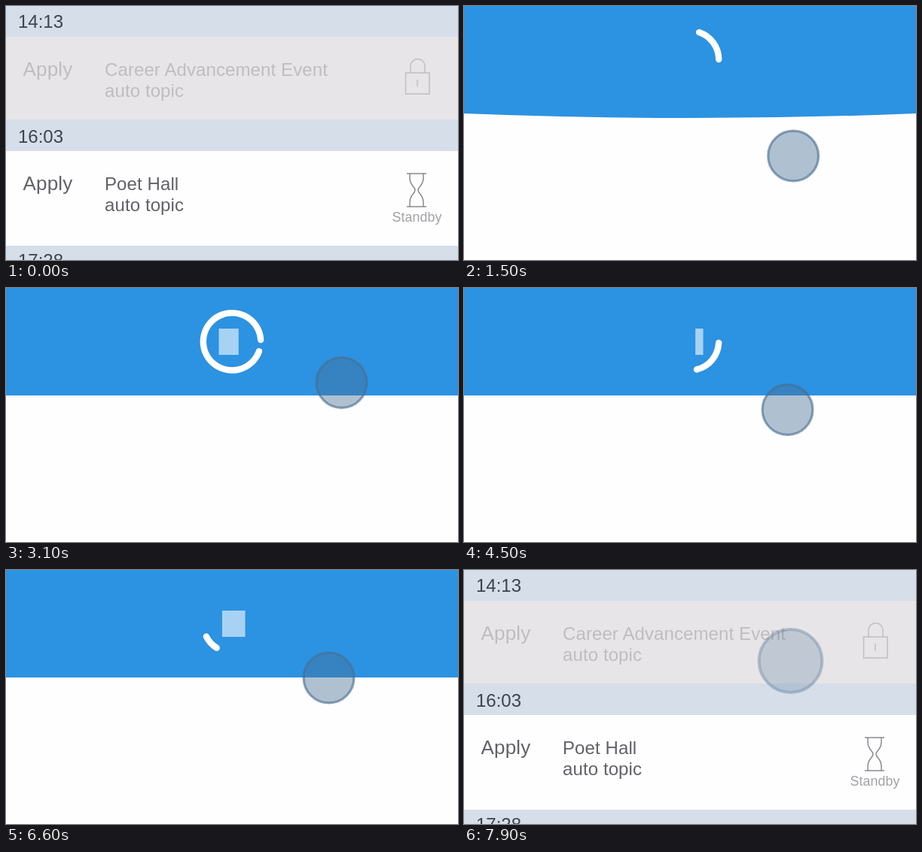
These frames come from a looping animation (600 px wide and 338 px high, 8 s). An HTML page:

```html
<!DOCTYPE html>
<html lang="en">
<head>
<meta charset="utf-8">
<title>Pull to refresh</title>
<style>
  html, body { margin: 0; width: 100%; height: 100%; overflow: hidden; background: #fefdff; }
  svg { display: block; width: 600px; height: 338px; }
  text { font-family: "Liberation Sans", Arial, sans-serif; font-size: 24px; letter-spacing: .1px; fill: #616266; }
  .bar { fill: #d6deea; }
  .time { fill: #3c4450; letter-spacing: 0; }
  .apply { font-size: 26px; letter-spacing: .2px; }
  .off text { fill: #bfbdbf; }
  .small { font-size: 17.8px; fill: #a2a2a4; }
  .icon { fill: none; stroke: #8a8a8d; stroke-width: 1.5; }
  .off .icon { stroke: #c1bfc1; }
  #ring { fill: none; stroke: #fff; stroke-width: 8.4; stroke-linecap: round; }
  #finger { fill: rgba(70, 113, 148, .43); stroke: rgba(72, 110, 142, .62); stroke-width: 3.2; }
</style>
</head>
<body>
<svg viewBox="0 0 600 338">
  <g id="list">
    <rect class="bar" width="600" height="41"/>
    <text class="time" x="16" y="29">14:13</text>

    <g class="off">
      <rect y="41" width="600" height="110" fill="#e8e5e8"/>
      <text class="apply" x="22.5" y="93">Apply</text>
      <text x="131" y="93">Career Advancement Event</text>
      <text x="131" y="121">auto topic</text>
      <path class="icon" d="M530.5 89H562V117H530.5ZM537 89V80A9.5 9.5 0 0 1 556 80V89M546 98V107"/>
    </g>

    <rect class="bar" y="151" width="600" height="42"/>
    <text class="time" x="16" y="182">16:03</text>
    <text class="apply" x="22.5" y="245">Apply</text>
    <text x="131" y="245">Poet Hall</text>
    <text x="131" y="273">auto topic</text>
    <path class="icon" d="M532 223H558M532 267H558M536 223V229C536 239 543 240 543 245S536 251 536 261V267M554 223V229C554 239 547 240 547 245S554 251 554 261V267"/>
    <text class="small" x="512.5" y="287">Standby</text>

    <rect class="bar" y="319" width="600" height="42"/>
    <text class="time" x="16" y="347">17:28</text>
  </g>
  <path id="header" fill="#2c92e2"/>
  <g id="loader">
    <path id="ring"/>
    <rect id="mark" y="54" height="35" fill="#a8d2f3"/>
  </g>
  <circle id="finger" r="33.4"/>
</svg>

<script>
const LOOP = 8000, REST = 143, RADIUS = 38.2, MARK = 35;
const RELEASE = 850, LOAD = 1300, DONE = 7300;

// Finger waypoints: time, x, y.
const path = [[100, 433, 121], [800, 436, 250], [2100, 438, 159.5], [3100, 445.5, 126],
              [4500, 429.5, 162], [6600, 428.5, 143.5], [7500, 433.5, 121]];

const sweep = (t, from, to) => Math.min(1, Math.max(0, (t - from) / (to - from)));
const ease = (t, from, to) => {
  const p = sweep(t, from, to);
  return p * p * (3 - 2 * p);
};
const easeOut = (t, from, to) => 1 - (1 - sweep(t, from, to)) ** 2;

const set = (id, attrs) => {
  const node = document.getElementById(id);
  for (const name in attrs) node.setAttribute(name, attrs[name]);
};

function drawHeader(t) {
  const closing = ease(t, DONE, DONE + 350);
  const edge = REST * (ease(t, 100, 700) - closing);
  const since = Math.max(0, t - RELEASE);
  const spring = Math.exp(-since / 300) * Math.cos(Math.PI * since / 150);
  const middle = edge + 2 * 110 * ease(t, 100, RELEASE) * spring;
  set("header", { d: `M0 0H600V${edge}Q300 ${middle} 0 ${edge}Z` });
  set("list", { transform: `translate(0 ${edge})`, opacity: 1 - ease(t, 250, 700) + closing });
}

function point(deg) {
  const a = deg * Math.PI / 180;
  return `${300 + RADIUS * Math.cos(a)} ${71.3 + RADIUS * Math.sin(a)}`;
}

// The ring turns steadily while its head runs out and its tail catches up.
function drawRing(t) {
  const spin = -83 + 0.057 * (t - LOAD);
  const tail = spin + 263 * ease(t, 3100, 4500);
  const head = spin + 337 * easeOut(t, LOAD, 3100) - 43 * sweep(t, 4500, 6600);
  const large = head - tail > 180 ? 1 : 0;
  set("ring", { d: `M${point(tail)}A${RADIUS} ${RADIUS} 0 ${large} 1 ${point(head + .01)}` });
}

// The mark is wiped in and out from the left, twice.
function drawMark(t) {
  const again = t > 4900;
  const to = again ? sweep(t, 4900, 6300) : sweep(t, 1600, 3600);
  const from = again ? sweep(t, 6500, DONE) : sweep(t, 3600, 4880);
  set("mark", { x: 300 + MARK * (from - .5), width: MARK * (to - from) });
}

function drawFinger(t) {
  const i = Math.max(1, path.findIndex(stop => stop[0] > t));
  const [a, b] = t < path.at(-1)[0] ? [path[i - 1], path[i]] : path.slice(-2);
  const p = ease(t, a[0], b[0]);
  const x = a[1] + (b[1] - a[1]) * p, y = a[2] + (b[2] - a[2]) * p;
  const press = ease(t, 100, 200) - ease(t, 800, 950) + ease(t, LOAD, 1450) - ease(t, 7820, LOOP);
  set("finger", {
    transform: `translate(${x} ${y}) scale(${1 + .6 * (1 - press)})`,
    opacity: press
  });
}

function draw(t) {
  drawHeader(t);
  drawRing(t);
  drawMark(t);
  drawFinger(t);
  set("loader", { opacity: t >= LOAD && t < DONE ? 1 : 0 });
}

const start = performance.now();
function tick() {
  draw((performance.now() - start) % LOOP);
  requestAnimationFrame(tick);
}
tick();
</script>
</body>
</html>
```
